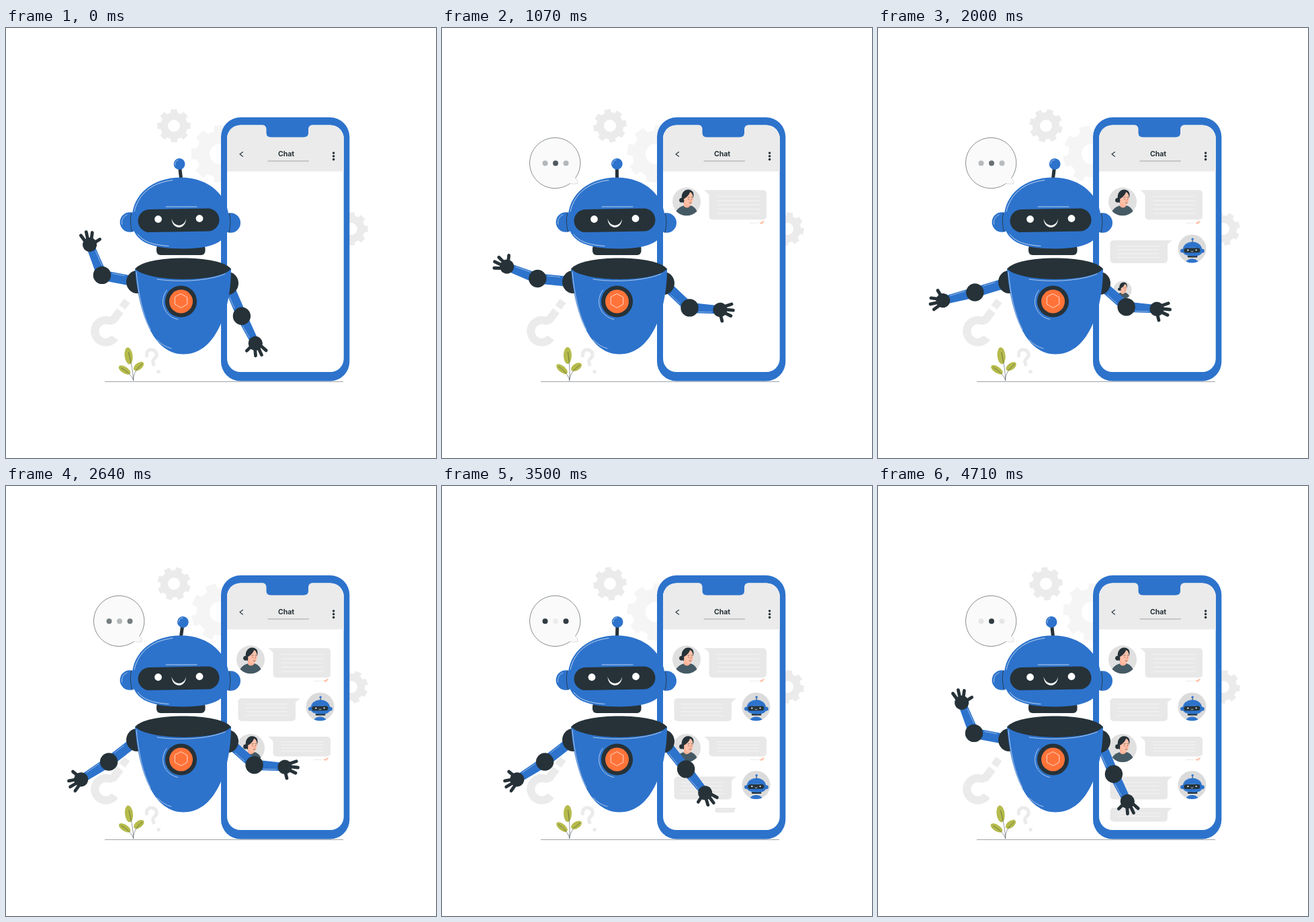
An HTML page with a canvas for the animation above (4780 ms loop, 640x640 px).

```html
<!DOCTYPE html>
<html lang="en">
<head>
<meta charset="utf-8">
<title>Chat robot</title>
<style>
html, body { margin: 0; width: 100%; height: 100%; overflow: hidden; background: #fff; }
canvas { display: block; width: 640px; height: 640px; }
</style>
</head>
<body>
<canvas id="stage"></canvas>
<script>
const LOOP = 4780, STEPS = 67, FRAME = LOOP / STEPS, TAU = Math.PI * 2, RAD = Math.PI / 180;
const BLUE = '#2d73cc', DARK = '#263238', GREY = '#ebebeb', ORANGE = '#ff7339', SHINE = 'rgba(255,255,255,.75)';

const canvas = document.getElementById('stage');
const ctx = canvas.getContext('2d');
const ratio = window.devicePixelRatio || 1;
canvas.width = canvas.height = 640 * ratio;

const clamp = v => Math.max(0, Math.min(1, v));
const linear = (t, from, to) => clamp((t - from) / (to - from));
const ease = (t, from, to) => { const p = linear(t, from, to); return p * p * (3 - 2 * p); };
const swing = (t, period) => (1 - Math.cos(TAU * t / period)) / 2;

// Keys are [time, value] pairs.
function track(t, keys, shape = ease) {
  let value = keys[0][1];
  for (let i = 1; i < keys.length; i++) {
    const [t0, v0] = keys[i - 1], [t1, v1] = keys[i];
    if (t >= t0) value = v0 + (v1 - v0) * shape(t, t0, t1);
  }
  return value;
}

function at(x, y, angle, scale, draw) {
  ctx.save();
  ctx.translate(x, y);
  ctx.rotate(angle * RAD);
  ctx.scale(scale, scale);
  draw();
  ctx.restore();
}
function fill(color, d) { ctx.fillStyle = color; ctx.fill(new Path2D(d)); }
function stroke(color, width, d, cap = 'round') {
  ctx.strokeStyle = color;
  ctx.lineWidth = width;
  ctx.lineCap = cap;
  ctx.lineJoin = 'round';
  ctx.stroke(new Path2D(d));
}
function oval(color, x, y, rx, ry = rx, angle = 0) {
  ctx.fillStyle = color;
  ctx.beginPath();
  ctx.ellipse(x, y, rx, ry, angle * RAD, 0, TAU);
  ctx.fill();
}
function box(color, x, y, w, h, r) {
  ctx.fillStyle = color;
  ctx.beginPath();
  ctx.roundRect(x, y, w, h, r);
  ctx.fill();
}
function arc(color, width, x, y, r, from, to) {
  ctx.strokeStyle = color;
  ctx.lineWidth = width;
  ctx.beginPath();
  ctx.arc(x, y, r, from * RAD, to * RAD);
  ctx.stroke();
}

function gear(x, y, r, hole, color, angle) {
  at(x, y, angle, 1, () => {
    ctx.fillStyle = color;
    ctx.beginPath();
    for (let i = 0; i < 8; i++) {
      for (const [offset, size] of [[-14, .81], [-10.5, 1], [10.5, 1], [14, .81]]) {
        const a = (i * 45 + offset) * RAD;
        ctx.lineTo(Math.cos(a) * r * size, Math.sin(a) * r * size);
      }
    }
    ctx.closePath();
    ctx.moveTo(hole, 0);
    ctx.arc(0, 0, hole, 0, TAU);
    ctx.fill('evenodd');
  });
}

function background(t) {
  const spin = 360 * t / LOOP;
  gear(250, 145.5, 25, 9, GREY, spin);
  gear(318, 187.5, 43, 15, '#f5f5f5', -spin);
  gear(514, 299, 25, 9, GREY, -spin);

  stroke(GREY, 12, 'M162 461A16.5 16.5 0 1 1 155 436L160 434L170 421', 'butt');
  at(176.5, 411, 37, 1, () => box(GREY, -5.5, -6, 11, 12, 0));
  stroke(GREY, 5, 'M209.5 490C208 480 214 478 218 479C225 481 226 488 221 492C217 495 219 499 220.5 503', 'butt');
  oval(GREY, 227, 511.5, 2.8);
}

function plant(t) {
  at(189.5, 525, 7 * swing(t, LOOP / 2), 1, () => {
    oval('#b5bb4b', -7, -37, 6, 12.5, -7);
    oval('#b5bb4b', -13, -16, 10, 4.8, 32);
    oval('#b5bb4b', 8, -21.5, 8.8, 5, -38);
    stroke('rgba(38,50,56,.7)', .7, 'M0 0C0 -12 -3 -26 -7 -42M0 -2C-4 -9 -9 -14 -18 -19M0 -1C0 -10 4 -17 13 -25');
  });
}

function speech(t) {
  ctx.save();
  ctx.globalAlpha = ease(t, 70, 420);
  const tail = 'M190.3 231.6Q197 233 202 231.5Q203 229 198.8 223.1';
  const ring = 'M190.3 231.6A37.7 37.7 0 1 1 198.8 223.1';
  fill('#fafafa', ring + 'Q203 229 202 231.5Q197 233 190.3 231.6Z');
  stroke(DARK, .55, ring);
  stroke('#c4c8ca', .6, tail);
  const outer = track(t, [[570, .62], [1500, .1], [2640, .62], [3500, .95], [4070, .1]]);
  const middle = track(t, [[570, .62], [1500, .95], [2640, .32], [3500, .07], [4070, .95]]);
  [outer, middle, outer].forEach((alpha, i) => {
    oval(`rgba(38,50,56,${alpha})`, 153.5 + i * 15.5, 201.3, 4);
  });
  ctx.restore();
}

function person() {
  oval('#e0e0e0', 0, 0, 21);
  ctx.beginPath();
  ctx.arc(0, 0, 21, 0, TAU);
  ctx.clip();
  oval(DARK, -7.5, -2, 3.4);
  fill(DARK, 'M-7 -3C-9 -14 -1 -20 6 -17C11 -15 11 -10 10 -6L2 2L-5 2Z');
  fill('#455a64', 'M-18 23C-17 12 -10 7 -3 6L6 6C13 8 16 13 18 23Z');
  fill('#ffb59a', 'M-4 -1L-4 7Q1 12 6 6L5 -1Z');
  fill('#ffc1a8', 'M-4 -4C0 -6 4 -10 5 -14C9 -13 10 -8 9.5 -2C8.5 5 4 7.5 0 4Q-4 0 -4 -4Z');
  stroke(DARK, .6, 'M2 -6L4 -6.5M7 -6.5L8.5 -6M3 -3.8V-3M7.6 -3.8V-3M4 2Q5.5 3 7 1.8');
  stroke('#ff7f66', .6, 'M5.5 -3L6.5 -.5L5 -.3');
}

function miniRobot() {
  oval('#dbdbdb', 0, 0, 21);
  ctx.beginPath();
  ctx.arc(0, 0, 21, 0, TAU);
  ctx.clip();
  box(BLUE, -11, 15, 22, 14, [10, 10, 0, 0]);
  at(.5, .5, 0, .2, () => { ctx.translate(-260, -276); head(0, 226.5, 288); });
}

function message(t, start, bot, y, height, lines, hasAvatar) {
  const grow = ease(t, start, start + 500), pop = ease(t, start - 100, start + 130);
  if (hasAvatar && pop > 0) at(bot ? 467.5 : 364, y + (bot ? 12.5 : 17), 0, pop, bot ? miniRobot : person);
  if (grow <= 0) return;
  const dir = bot ? -1 : 1;
  at(bot ? 438 : 390, y, 0, grow, () => {
    fill('#e8e8e8', `M0 0H${14 * dir}L${9 * dir} 10Q${7 * dir} 5 0 0`);
    box('#e8e8e8', bot ? -92.5 : 7.5, 0, 85.5, height, 5);
    const gap = (height - 6) / (lines + 1);
    for (let i = 1; i <= lines; i++) {
      const lineY = 3 + i * gap;
      stroke('#f8f8f8', .8, `M${20 * dir} ${lineY}H${82 * dir}`);
    }
  });
  if (!bot && grow === 1) {
    const base = y + height + 4;
    stroke('#dedede', .6, `M458 ${base + 1}H470`);
    stroke(ORANGE, .7, `M473 ${base}l1.5 1.8l3 -3.6M475.5 ${base + 1}l.8 .8l3 -3.6`);
  }
}

function phone(t) {
  box(BLUE, 320, 133, 191.3, 392.5, 29);
  box('#fff', 329, 144.5, 173.7, 367.5, 20);
  box(GREY, 329, 144.5, 173.7, 69, [20, 20, 0, 0]);
  fill(BLUE, 'M382 144Q387 145 387.5 150V156Q387.5 162.5 394 162.5H443Q450 162.5 450 156V150Q450.5 145 456 144Z');
  stroke(DARK, 1.1, 'M352.5 184.5L348 187.8L352.5 191.2');
  ctx.fillStyle = DARK;
  ctx.font = '700 10.5px Inter, "Open Sans", sans-serif';
  ctx.textAlign = 'center';
  ctx.fillText('Chat', 417, 191.3);
  stroke('#a0a3a5', 1.1, 'M390 198H450.5');
  for (const y of [186, 190.8, 195.6]) oval(DARK, 487.6, y, 1.8);

  message(t, 180, false, 241.3, 44, 5, true);
  message(t, 1250, true, 316, 34, 4, true);
  message(t, 1960, false, 373, 29.5, 4, true);
  message(t, 2760, true, 432.5, 34, 4, true);
  message(t, 3300, true, 479, 20.5, 2, false);
}

function hand() {
  oval(DARK, 0, 0, 10.6);
  stroke(DARK, 4.8, 'M3 -4L16.5 -9.5M4 -1L19.5 -.5M4 3L16.5 8M0 4L4 16.5');
}

function arm(x, y, upper, lower, reach, wrist) {
  const ex = x + 53 * Math.cos(upper * RAD), ey = y + 53 * Math.sin(upper * RAD);
  at(x, y, upper, 1, () => {
    box(BLUE, 6, -7.5, 40, 15, 2);
    stroke(SHINE, .6, 'M20 5.5H38');
  });
  oval(DARK, x, y, 16, 17);
  at(ex, ey, lower, 1, () => {
    fill(BLUE, `M6 -7.5L${reach - 7} -6.2V6.2L6 7.5Z`);
    stroke(SHINE, .6, `M14 5.3L${reach - 12} 4.4`);
    at(reach, 0, wrist, 1, hand);
  });
  oval(DARK, ex, ey, 13.2);
}

function head(tilt, leftEye, rightEye) {
  at(260.5, 224, tilt, 1, () => {
    stroke(DARK, 5, 'M0 2V-15', 'butt');
    oval(BLUE, 0, -21.7, 8.4);
    arc(SHINE, .7, 0, -21.7, 6.4, 170, 265);
  });
  box(DARK, 224, 322, 72.5, 16, 6);
  oval(BLUE, 184.3, 289, 14.7);
  oval(BLUE, 334.3, 290, 14.7);
  arc(SHINE, .7, 184.3, 289, 12, 165, 250);
  stroke(DARK, .8, 'M186.5 275Q183.5 289 187.5 303M332.5 276Q335.5 290 332 304');
  fill(BLUE, 'M187.5 284C188 246 220 222.5 260 222.5C303 222.5 332 250 332 287C332 316 314 328 264 328.5C212 328.5 187 317 187.5 284Z');
  stroke(SHINE, .9, 'M191 273C197 247 217 230 248 226.5M196 307C204 318 219 323 242 324.5M238 266H284');
  at(257, 286.3, -1, 1, () => box(DARK, -60.5, -17, 121, 34, 17));
  oval('#fff', leftEye, 284.5, 5.4);
  oval('#fff', rightEye, 283.5, 5.4);
  fill('#fff', 'M246.5 283.5C247 301 267.5 301 268 284C265 297 250 297 246.5 283.5Z');
}

function torso() {
  fill(BLUE, 'M192 358C196 412 214 485.5 264 485.5C316 485.5 335 412 335 358Z');
  fill(DARK, 'M192 358.5C208 337 319 337 335 358.5C318 379 212 379 192 358.5Z');
  stroke(SHINE, .8, 'M225 374C262 379 302 376 326 366M194 363C197 397 204 428 215 449M225 464Q234 474 246 477');
  oval(DARK, 260.5, 407, 23.6);
  oval(ORANGE, 260.5, 407, 17.5);
  stroke('#ffe3d6', .9, 'M260.5 395.7L269.7 400.8V411.2L260.5 416.4L251.3 411.2V400.8Z');
  arc(SHINE, .8, 260.5, 407, 27, 100, 218);
}

function robot(t) {
  const raised = LOOP - FRAME;
  const raising = t > 3500;
  const leftUpper = raising
    ? track(t, [[3500, 37.8], [4070, 31.2], [raised, -11]], linear)
    : track(t, [[600, -11], [1320, -3.3], [1710, -3.3], [2290, 37.8]]);
  const leftLower = raising
    ? track(t, [[3500, -32.5], [4070, 30.6], [raised, 68]], linear)
    : track(t, [[600, 68], [1320, 3.4], [1710, 3.4], [2290, -32.5]]);
  const wrist = track(t, [[600, 8], [1320, 0], [3500, 0], [raised, 8]]);
  arm(195, 378, 180 - leftUpper, 180 + leftLower, 49, wrist);

  const rightUpper = track(t, [[400, 66.8], [1200, 41.6], [3200, 41.6], [3900, 66.8]]);
  const rightLower = track(t, [[100, 63.4], [880, 3.8], [3000, 3.8], [3700, 63.4]]);
  arm(330, 380, rightUpper, rightLower, 45.5, 0);

  torso();
  const leftEye = track(t, [[100, 226.5], [570, 224], [1100, 226.5], [2900, 226.5], [3500, 223], [4000, 226.5]]);
  const rightEye = track(t, [[100, 288], [570, 289], [1100, 288], [2900, 288], [3500, 288.5], [LOOP, 288]]);
  head(-6.5 + 14.5 * swing(t, LOOP), leftEye, rightEye);
}

function render(now) {
  const t = Math.floor(((now % LOOP) + 2) / FRAME) % STEPS * FRAME;
  ctx.setTransform(ratio, 0, 0, ratio, 0, 0);
  ctx.fillStyle = '#fff';
  ctx.fillRect(0, 0, 640, 640);
  background(t);
  stroke('#7d8488', .8, 'M147 526.3H502', 'butt');
  plant(t);
  speech(t);
  phone(t);
  robot(t);
}

const begin = performance.now();
function tick() {
  render(performance.now() - begin);
  requestAnimationFrame(tick);
}
tick();
</script>
</body>
</html>
```
